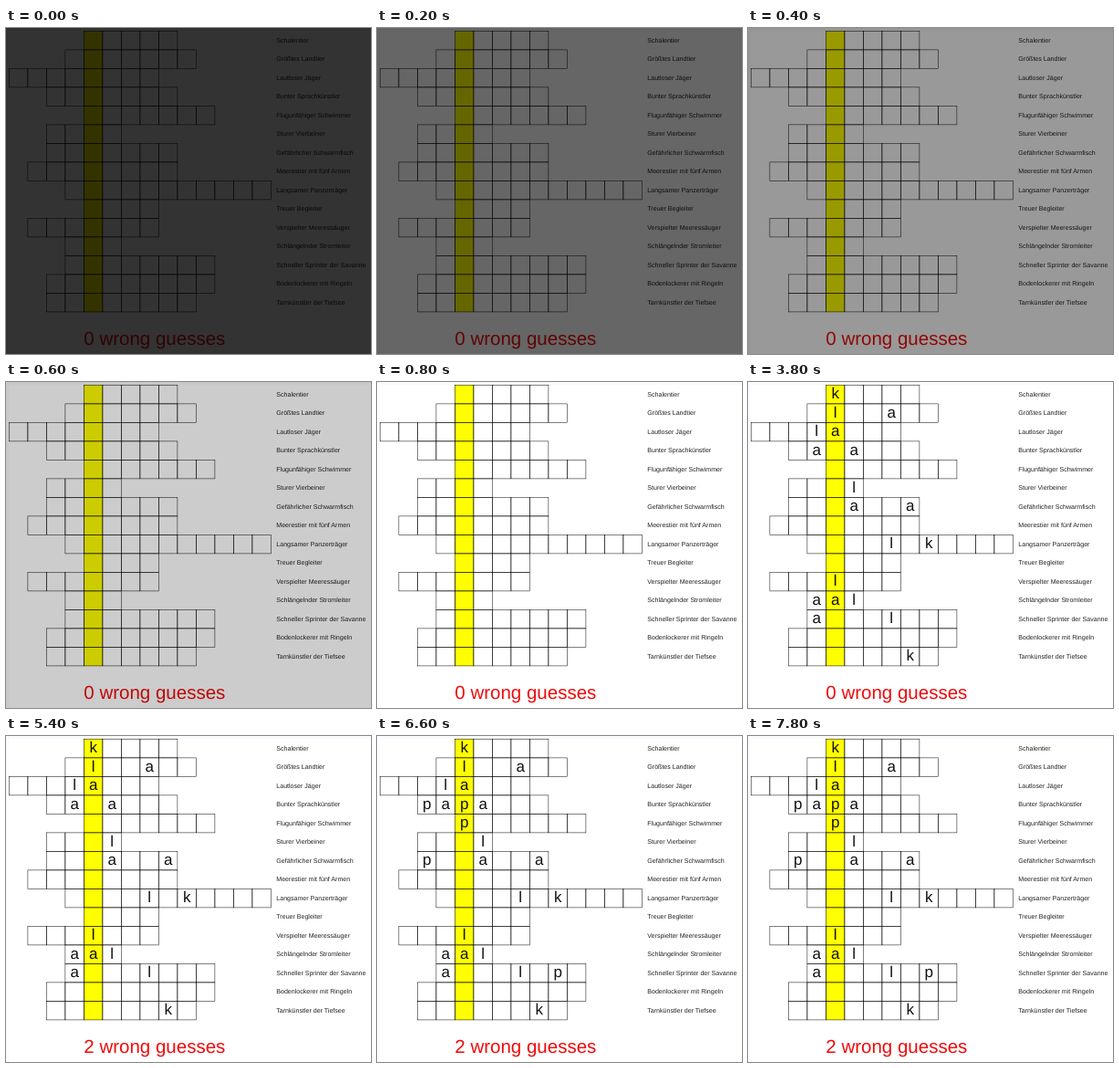
Animation of 400 by 357 pixels, one loop 8 s. Source, as an HTML page:

```html
<!DOCTYPE html>
<html lang="de">
<head>
<meta charset="utf-8">
<title>Kreuzworträtsel</title>
<style>
  html, body { margin: 0; width: 100%; height: 100%; overflow: hidden; background: #fff; }
  svg {
    display: block; width: 100%; height: 100%;
    font-family: "Liberation Sans", Arial, sans-serif; text-rendering: geometricPrecision;
  }
  .cell { fill: none; stroke: #000; stroke-width: 0.5; }
  .hint { font-size: 7.07px; fill: #222; }
  .letter { font-size: 17px; fill: #111; text-anchor: middle; }
  .score { font-size: 20.5px; fill: #f00a0a; }
</style>
</head>
<body>
<svg id="stage" viewBox="0 0 400 357"></svg>
<script>
const LOOP = 8000, CELL = 20.5, KEY_COLUMN = 4;
const stage = document.getElementById('stage');

// first column, word, hint
const rows = [
  [4, 'krebs', 'Schalentier'],
  [3, 'elefant', 'Größtes Landtier'],
  [0, 'schlange', 'Lautloser Jäger'],
  [2, 'papagei', 'Bunter Sprachkünstler'],
  [4, 'pinguin', 'Flugunfähiger Schwimmer'],
  [2, 'esel', 'Sturer Vierbeiner'],
  [2, 'piranha', 'Gefährlicher Schwarmfisch'],
  [1, 'seestern', 'Meerestier mit fünf Armen'],
  [3, 'schildkröte', 'Langsamer Panzerträger'],
  [4, 'hund', 'Treuer Begleiter'],
  [1, 'seelöwe', 'Verspielter Meeressäuger'],
  [3, 'aal', 'Schlängelnder Stromleiter'],
  [3, 'antilope', 'Schneller Sprinter der Savanne'],
  [2, 'regenwurm', 'Bodenlockerer mit Ringeln'],
  [2, '..e...k.', 'Tarnkünstler der Tiefsee']
];
const guessedAt = { k: 2200, l: 3000, a: 3800, p: 6200 };
const scores = [
  ['0 wrong guesses', 0, 4600],
  ['1 wrong guess', 4600, 5400],
  ['2 wrong guesses', 5400, LOOP]
];
const fade = [[0, 0.8], [200, 0.6], [400, 0.4], [600, 0.2], [800, 0]];

function add(tag, attrs, text = '') {
  const el = document.createElementNS('http://www.w3.org/2000/svg', tag);
  for (const name in attrs) el.setAttribute(name, attrs[name]);
  el.textContent = text;
  return stage.appendChild(el);
}

// steps: [time, opacity] pairs, each held until the next
function holdSteps(el, steps) {
  const frames = steps.map(([time, opacity]) => ({ offset: time / LOOP, opacity, easing: 'step-end' }));
  frames.push({ offset: 1, opacity: steps[steps.length - 1][1] });
  el.animate(frames, { duration: LOOP, iterations: Infinity });
}

function showBetween(el, from, to) {
  const steps = from > 0 ? [[0, 0], [from, 1]] : [[0, 1]];
  if (to < LOOP) steps.push([to, 0]);
  holdSteps(el, steps);
}

const edge = i => 3.4 + CELL * i;
const middle = i => edge(i + 0.5);

add('rect', { width: 400, height: 357, fill: '#fafaff' });
add('rect', { x: 3, y: 3, width: 397, height: 354, fill: '#fff' });
add('rect', { x: edge(KEY_COLUMN), y: edge(0), width: CELL, height: CELL * rows.length, fill: '#ff0' });

rows.forEach(([start, word, hint], row) => {
  add('text', { class: 'hint', x: 296.3, y: middle(row) + 2 }, hint);
  [...word].forEach((char, i) => {
    const column = start + i;
    // neighbouring outlines overlap, so shared edges come out darker
    add('rect', { class: 'cell', x: edge(column), y: edge(row), width: CELL, height: CELL });
    if (!(char in guessedAt)) return;
    const letter = add('text', { class: 'letter', x: middle(column), y: middle(row) + 4.6 }, char);
    showBetween(letter, guessedAt[char], LOOP);
  });
});

for (const [text, from, to] of scores) {
  showBetween(add('text', { class: 'score', x: 85.3, y: 347.1 }, text), from, to);
}

holdSteps(add('rect', { width: 400, height: 357, fill: '#000' }), fade);
</script>
</body>
</html>
```
